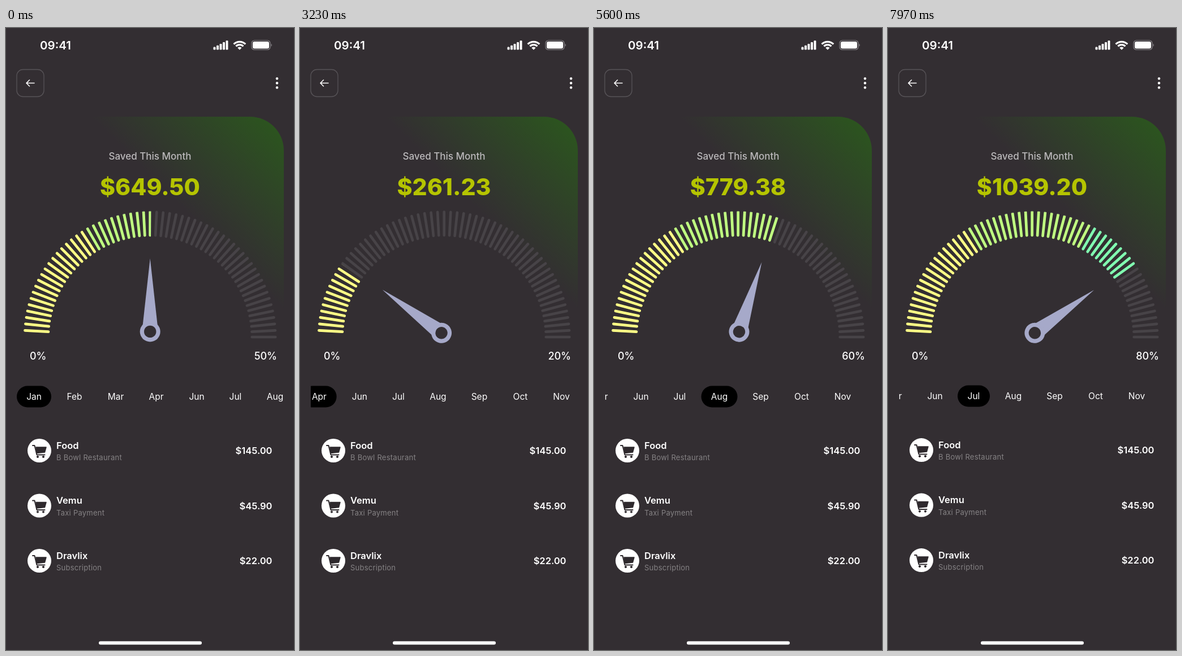
Write an HTML page that moves like this. It is 509x1101 px and loops after 8000 ms.

```html
<!DOCTYPE html>
<html lang="en">
<head>
<meta charset="utf-8">
<title>Savings gauge</title>
<style>
html, body { margin: 0; width: 100%; height: 100%; overflow: hidden; background: #332e32; }
svg { display: block; width: 509px; height: 1101px; font-family: Inter, "Noto Sans", sans-serif; fill: #fff; }
.mid { text-anchor: middle; }
.end { text-anchor: end; }
.line { fill: none; stroke: #fff; }
.label { font-size: 18px; font-weight: 500; }
.month { font-size: 15.5px; }
.title { font-size: 16.5px; font-weight: 600; }
.note { font-size: 13px; letter-spacing: .25px; fill: #858284; }
</style>
</head>
<body>
<svg viewBox="0 0 509 1101">
  <defs>
    <linearGradient id="glow" gradientUnits="userSpaceOnUse" x1="491" y1="157" x2="320" y2="328">
      <stop stop-color="#2b581d"/>
      <stop offset="1" stop-color="#2b581d" stop-opacity="0"/>
    </linearGradient>
    <clipPath id="sector"><path id="wedge"/></clipPath>
    <clipPath id="view"><rect y="605" width="509" height="470"/></clipPath>
    <clipPath id="strip"><rect x="19" y="620" width="471" height="64"/></clipPath>
    <g id="cart">
      <circle r="21"/>
      <g fill="#2e292d" stroke="#2e292d" stroke-linecap="round" stroke-linejoin="round">
        <path d="M-6-6H12L9.5 3L-4.5 4.5Z" stroke-width="1.5"/>
        <path d="M-12-9H-8.5L-4.5 7.5H9.5" fill="none" stroke-width="2"/>
        <circle cx="-3" cy="11" r="1.6"/><circle cx="7" cy="11" r="1.6"/>
      </g>
    </g>
  </defs>

  <rect width="509" height="1101" fill="#332e32"/>

  <text x="60" y="38" font-size="20.5" font-weight="600">09:41</text>
  <g id="bars"></g>
  <g class="line">
    <path d="M402.6 28.6A14.6 14.6 0 0 1 423.2 28.6" stroke-width="3.4"/>
    <path d="M406.4 32.4A9.2 9.2 0 0 1 419.4 32.4" stroke-width="3.2"/>
    <rect x="434" y="22" width="33" height="16.5" rx="5" stroke="#878488" stroke-width="1.2"/>
  </g>
  <path d="M412.9 38.7L409.2 35A5.3 5.3 0 0 1 416.6 35Z"/>
  <rect x="436" y="24" width="29" height="12.5" rx="3.2"/>
  <path d="M468.5 27.5A3.5 3.5 0 0 1 468.5 33Z" fill="#878488"/>

  <rect class="line" x="19" y="73.5" width="48" height="48" rx="11" style="stroke:#575357" stroke-width="1.3"/>
  <path class="line" d="M50 97.500H36M41.500 92L36 97.500L41.500 103" stroke-width="1.6" stroke-linecap="round" stroke-linejoin="round"/>
  <circle cx="479" cy="89.500" r="2.200"/><circle cx="479" cy="97.500" r="2.200"/><circle cx="479" cy="105.500" r="2.200"/>

  <path d="M19 157H431A60 60 0 0 1 491 217V590H19Z" fill="url(#glow)"/>
  <text class="mid" x="254.500" y="232.500" font-size="17" font-weight="500" fill="#bbb9bb">Saved This Month</text>
  <text class="mid" id="amount" x="254.500" y="295.500" font-size="41" font-weight="800" fill="#b5c400"></text>

  <g id="dim" stroke="#474347" stroke-width="4.700" stroke-linecap="round"></g>
  <g clip-path="url(#sector)"><g id="lit" stroke-width="4.700" stroke-linecap="round"></g></g>
  <g id="needle" fill="#a6a9c9">
    <path d="M254.700 408L268.200 530H241.200Z"/>
    <circle cx="254.700" cy="537.400" r="18"/>
    <circle cx="254.700" cy="537.400" r="10.700" fill="#332e32"/>
  </g>
  <text class="label" x="42" y="586.500">0%</text>
  <text class="label end" id="percent" x="479" y="586.500"></text>

  <g clip-path="url(#view)">
    <g id="content">
      <g clip-path="url(#strip)"><g id="months"></g></g>
      <g id="list"></g>
    </g>
  </g>
  <rect x="164" y="1085.500" width="182" height="6" rx="3"/>
</svg>

<script>
const $ = id => document.getElementById(id);
function add(parent, tag, attrs, text = '') {
  const el = document.createElementNS('http://www.w3.org/2000/svg', tag);
  for (const k in attrs) el.setAttribute(k, attrs[k]);
  el.textContent = text;
  return parent.appendChild(el);
}

const LOOP = 8000, CX = 254.7, TICK_Y = 547, MASK_Y = 553, GOAL = 1299;

// Name, centre and pill width of each month
const months = [
  ['Jan', 49.5, 61], ['Feb', 121, 63], ['Mar', 194, 63], ['Apr', 265.5, 62],
  ['Jun', 337, 62], ['Jul', 405.5, 57], ['Aug', 475.5, 64], ['Sep', 548.5, 63],
  ['Oct', 621, 62], ['Nov', 693.5, 64]
].map(([name, x, w]) => ({ name, x, w }));

// Time, month index and saved share of each selection
const taps = [
  [1650, 1, .8], [2330, 3, .2], [3772, 9, .5],
  [4410, 6, .6], [5820, 9, .5], [6276, 5, .8]
];

for (let i = 0; i < 5; i++) {
  const h = 5 + i * 2.8;
  add($('bars'), 'rect', { x: 366.5 + i * 5.5, y: 38.5 - h, width: 4, height: h, rx: 1.2 });
}

for (let i = 1; i <= 60; i++) {
  const a = i * Math.PI / 60, c = Math.cos(a), s = Math.sin(a);
  const line = {
    x1: CX - 221.5 * c, y1: TICK_Y - 221.5 * s,
    x2: CX - 180 * c, y2: TICK_Y - 180 * s
  };
  add($('dim'), 'line', line);
  add($('lit'), 'line', { ...line, stroke: i < 20 ? '#ffff85' : i < 40 ? '#bfff80' : '#80ffb0' });
}

for (const m of months) {
  m.pill = add($('months'), 'rect', { height: 38, y: 633.5, rx: 19, fill: '#000' });
  add($('months'), 'text', { class: 'month mid', x: m.x, y: 658 }, m.name);
}

[['Food', 'B Bowl Restaurant', '$145.00'],
 ['Vemu', 'Taxi Payment', '$45.90'],
 ['Dravlix', 'Subscription', '$22.00']].forEach(([title, note, cost], i) => {
  const y = 748 + i * 97.5, list = $('list');
  add(list, 'use', { href: '#cart', x: 59, y });
  add(list, 'text', { class: 'title', x: 89, y: y - 3.5 }, title);
  add(list, 'text', { class: 'note', x: 89, y: y + 17 }, note);
  add(list, 'text', { class: 'title end', x: 470.5, y: y + 6 }, cost);
});

// Remaining distance of a critically damped spring
const rest = (ms, w) => ms < 0 ? 1 : (1 + w * ms / 1000) * Math.exp(-w * ms / 1000);
const smooth = (t, a, b) => {
  const x = Math.min(1, Math.max(0, (t - a) / (b - a)));
  return x * x * (3 - 2 * x);
};

function draw(t) {
  // Overlapping springs add up, so interrupted moves keep their speed
  const weights = months.map(() => 0);
  weights[0] = 1;
  let share = .5, prev = [0, 0, .5];
  for (const tap of taps) {
    const q = 1 - rest(t - tap[0], 9.5);
    weights[prev[1]] -= q;
    weights[tap[1]] += q;
    share += (tap[2] - prev[2]) * q;
    prev = tap;
  }
  const blend = key => months.reduce((sum, m, i) => sum + m[key] * weights[i], 0);
  const x = blend('x'), w = blend('w');
  months.forEach((m, i) => {
    m.pill.setAttribute('x', x - w / 2);
    m.pill.setAttribute('width', w);
    m.pill.setAttribute('opacity', Math.max(0, weights[i]));
  });

  $('amount').textContent = '$' + (share * GOAL).toFixed(2);
  $('percent').textContent = Math.round(share * 100) + '%';
  $('needle').setAttribute('transform', `rotate(${share * 180 - 90} ${CX} 543.2)`);

  const point = deg => {
    const a = deg * Math.PI / 180;
    return `${CX - 228.5 * Math.cos(a)} ${MASK_Y - 228.5 * Math.sin(a)}`;
  };
  $('wedge').setAttribute('d',
    `M${CX} ${MASK_Y}L${point(-3)}A228.5 228.5 0 0 1 ${point(share * 180 + .4)}Z`);

  $('months').setAttribute('transform', `translate(${-254 * smooth(t, 2700, 3350)} 0)`);
  const lift = 109 * smooth(t, 6850, 7400) * rest(t - 7450, 13);
  $('content').setAttribute('transform', `translate(0 ${-lift})`);
}

function frame() {
  draw(performance.now() % LOOP);
  requestAnimationFrame(frame);
}
frame();
</script>
</body>
</html>
```
